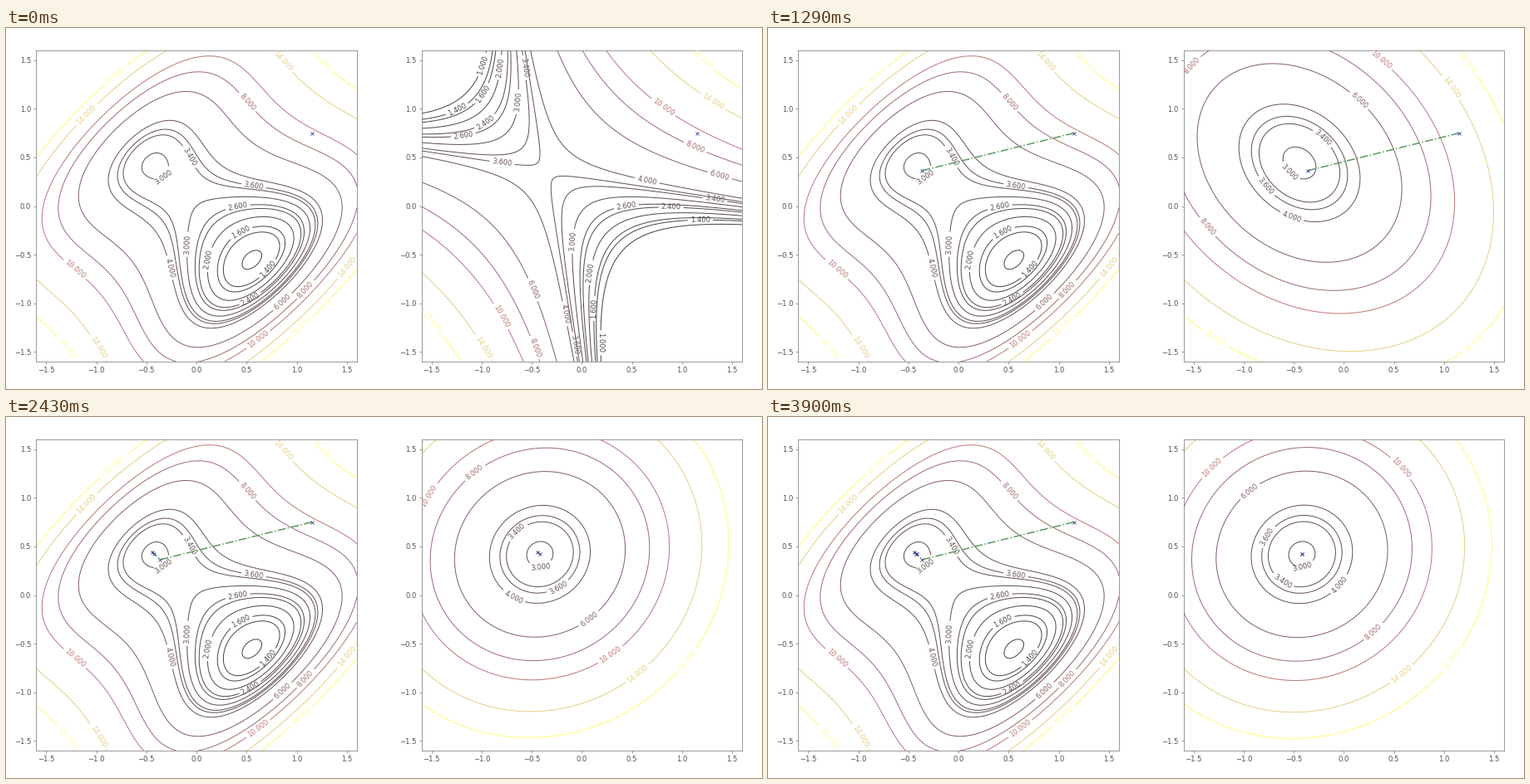
A matplotlib script that plays this animation: 909x435 px, repeating every 3930 ms.

```python
"""Newton's method on a quartic surface, next to its local quadratic model."""
import numpy as np
import matplotlib.pyplot as plt
from matplotlib.animation import FuncAnimation
from matplotlib.colors import LinearSegmentedColormap

W, H, DPI = 909, 435, 61
AX_W, AX_H, TOP = 385.6, 375, 27
LEFT_X, RIGHT_X = 36.3, 499.6
LIM, GRID = 1.6, 200
FRAMES, INTERVAL = 131, 30
STARTS = [0, 31, 54, 79, 104]  # first frame of each Newton iterate

LEVELS = [1, 1.4, 1.6, 2, 2.4, 2.6, 3, 3.4, 3.6, 4, 6, 8, 10, 14, 18]
WIDTHS = [1.2]*(len(LEVELS) - 1) + [2.2]
CMAP = LinearSegmentedColormap.from_list("ember", [
    (0, "#4a4648"), (0.18, "#6e5658"), (0.53, "#bd7b77"),
    (0.765, "#e6d087"), (1, "#fffcb0")])
FRAME, TEXT = "#6c6c6c", "#505050"


def f(x, y):
    return (x - y)**4 + 8*x*y - x + y + 3


def grad(p):
    x, y = p
    c = 4*(x - y)**3
    return np.array([c + 8*y - 1, -c + 8*x + 1])


def hess(p):
    c = 12*(p[0] - p[1])**2
    return np.array([[c, 8 - c], [8 - c, c]])


def model(p, x, y):
    """Second order Taylor expansion of f around p."""
    dx, dy = x - p[0], y - p[1]
    g, h = grad(p), hess(p)
    return (f(*p) + g[0]*dx + g[1]*dy
            + 0.5*(h[0, 0]*dx**2 + 2*h[0, 1]*dx*dy + h[1, 1]*dy**2))


def newton(p, steps):
    path = [np.array(p)]
    for _ in range(steps):
        p = path[-1]
        path.append(p - np.linalg.solve(hess(p), grad(p)))
    return path


def contour_axes(left, z):
    ax = fig.add_axes([left/W, 1 - (TOP + AX_H)/H, AX_W/W, AX_H/H])
    ticks = np.arange(-1.5, 1.6, 0.5)
    ax.set(xlim=(-LIM, LIM), ylim=(-LIM, LIM), xticks=ticks, yticks=ticks)
    ax.tick_params(color=FRAME, labelcolor=TEXT)
    ax.spines[:].set_color(FRAME)
    cs = ax.contour(X, Y, z, LEVELS, cmap=CMAP, linewidths=WIDTHS)
    cs.clabel(fmt="%1.3f", fontsize=10, inline_spacing=3)
    return ax


def draw_path(ax, pts):
    x, y = np.transpose(pts)
    line, = ax.plot(x, y, "-.", color="#5a9a60", lw=1.8, zorder=5)
    marks, = ax.plot(x, y, "x", color="#34389a", ms=5.6, zorder=6)
    return line, marks


fig = plt.figure(figsize=(W/DPI, H/DPI), dpi=DPI, facecolor="white")
axis = np.linspace(-LIM, LIM, GRID)
X, Y = np.meshgrid(axis, axis)
points = newton([1.15, 0.75], len(STARTS) - 1)

trail = draw_path(contour_axes(LEFT_X, f(X, Y)), points[:1])

model_axes = []
for k, p in enumerate(points):
    ax = contour_axes(RIGHT_X, model(p, X, Y))
    draw_path(ax, points[max(k - 1, 0):k + 1])
    model_axes.append(ax)


def update(i):
    step = np.searchsorted(STARTS, i, side="right") - 1
    for k, ax in enumerate(model_axes):
        ax.set_visible(k == step)
    for artist in trail:
        artist.set_data(*np.transpose(points[:step + 1]))
    return trail


anim = FuncAnimation(fig, update, frames=FRAMES, interval=INTERVAL,
                     repeat=True, repeat_delay=0, blit=False)
plt.show()
```
